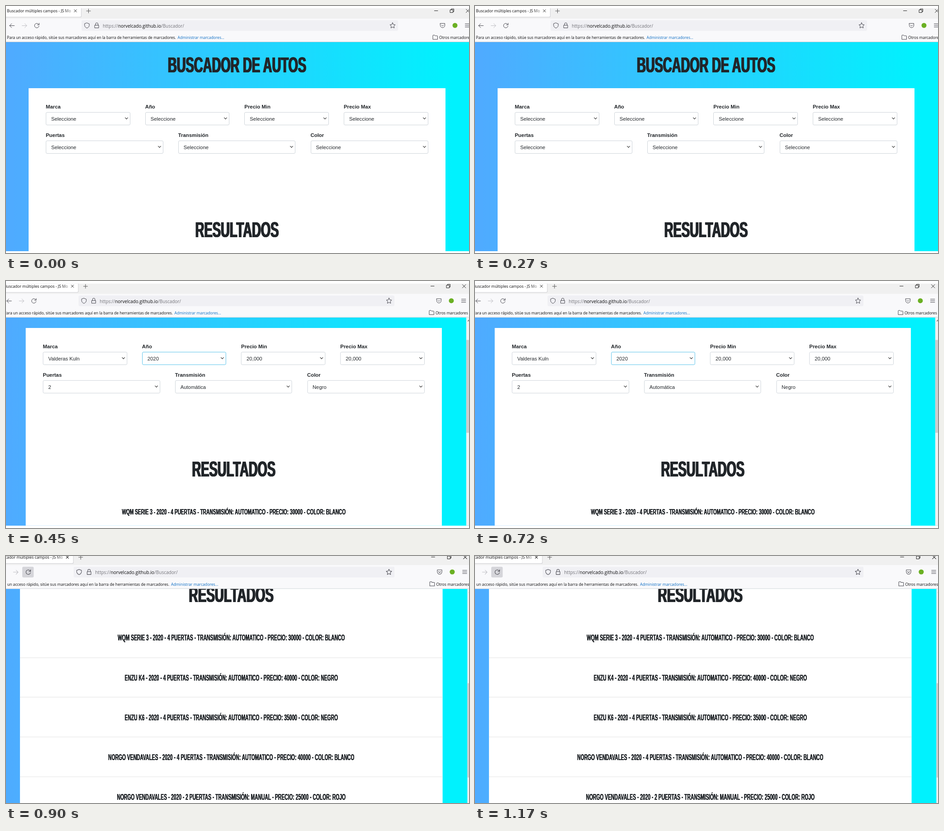
An HTML page for the animation above (1.35 s loop, 1024 px wide and 547 px high).

```html
<!DOCTYPE html>
<html lang="es">
<head>
<meta charset="utf-8">
<title>Buscador múltiples campos</title>
<style>
html, body { margin: 0; width: 100%; height: 100%; overflow: hidden; background: #fff; }
#stage { position: relative; width: 1024px; height: 547px; overflow: hidden; }
#win { position: absolute; left: 0; top: 0; width: 1040px; height: 600px; transform-origin: 0 0; }
#page { position: absolute; left: 0; top: 80px; width: 1040px; overflow: hidden;
  background: linear-gradient(90deg, #50aaff, #00f2fe 990px); }
#content { position: absolute; left: 0; top: -80px; width: 1026px; }
#card { position: absolute; left: 50px; top: 182px; width: 922px; height: 1000px; background: #fff; }
#bar { position: absolute; left: 1026px; top: 0; width: 14px; height: 100%; background: #f0f0f0; }
#thumb { position: absolute; width: 100%; height: 206px; background: #cdcdcd; }
#chrome { position: absolute; left: 0; top: 0; }
/* zero line height: "top" is the middle of the capitals */
.t { position: absolute; line-height: 0; white-space: nowrap; color: #212529; }
.ui { font: 8.55px/0 "Open Sans", "Noto Sans", sans-serif; color: #0c0c0d; }
.tab { font-size: 8.7px; }
.url { font-size: 9.95px; color: #737379; }
.url b { font-weight: 400; color: #0c0c0d; }
.link { color: #0a6cc4; }
.label { font: bold 11.4px/0 "Liberation Sans", Arial, sans-serif; }
.h, .row { font: bold 47.5px/0 "Liberation Sans", Arial, sans-serif; left: 510.7px;
  transform: translateX(-50%) scaleX(.577); text-shadow: .036em 0, -.036em 0; }
.row { font-size: 17.3px; transform: translateX(-50%) scaleX(.587); text-shadow: .012em 0, -.012em 0; }
.rule { position: absolute; left: 50px; width: 922px; height: 1px; background: #e3e3e3; }
.select { position: absolute; box-sizing: border-box; height: 29.5px; border: 1px solid #ced4da;
  border-radius: 3px; background: #fff; color: #24282c; padding-left: 11px;
  font: 11.3px/28.5px "Liberation Sans", Arial, sans-serif; }
.select::after { content: ""; position: absolute; right: 5px; top: 9.5px; width: 4px; height: 4px;
  border: solid #222; border-width: 0 1.4px 1.4px 0; transform: rotate(45deg); }
.select.focus { border-color: #59c2ea; }
</style>
</head>
<body>
<div id="stage">
  <div id="win">
    <div id="page">
      <div id="content"><div id="card"></div></div>
      <div id="bar">
        <div id="thumb"></div>
        <svg width="14" height="14" fill="none" stroke="#606060" stroke-width="1.4"><path d="M3.5 8.5l3-3 3 3"/></svg>
      </div>
    </div>
    <svg id="chrome" width="1040" height="80" fill="none" stroke="#45454d" stroke-linecap="round" stroke-linejoin="round">
      <g stroke="none">
        <path fill="#f0f0f0" d="M0 5h1040v23H0z"/>
        <path fill="#f9f9fb" d="M0 28h1040v52H0z"/>
        <path fill="#cfcfd3" d="M0 79h1040v1H0z"/>
        <path fill="#d0d0d4" d="M0 5h167v17.500a2.500 2.500 0 0 1-2.500 2.500H0z"/>
        <path fill="#fff" d="M0 5h166v17a2 2 0 0 1-2 2H0z"/>
        <rect fill="#f0f0f4" x="167" y="31.500" width="700" height="23.500" rx="3"/>
        <rect id="press" fill="#d5d5da" x="55" y="31.500" width="25" height="23.500" rx="3"/>
        <circle fill="#6ab023" cx="993" cy="43" r="5.500"/>
      </g>
      <path d="M18.500 43.500H8M12.500 39L8 43.500l4.500 4.500"/>
      <path stroke="#bdbdc2" d="M35.500 43.500H46M41.500 39l4.500 4.500-4.500 4.500"/>
      <path d="M72.500 41A5 5 0 1 0 73 44.500M73.300 38v3.800h-3.800"/>
      <path d="M179 37.500l5.200 2v3c0 3-2 5-5.200 6.500-3.200-1.500-5.200-3.500-5.200-6.500v-3z"/>
      <path d="M196.500 42.500h8.500v6h-8.500zM198 42.500V40a2.750 2.750 0 0 1 5.500 0v2.500"/>
      <path d="M855 37l1.800 4 4.200.5-3.100 2.900.8 4.300-3.700-2.100-3.700 2.100.8-4.300-3.100-2.900 4.200-.5z"/>
      <path d="M960.500 38.500h10v4.500a5 5 0 0 1-10 0zM963 42l2.500 2.500 2.500-2.500"/>
      <path d="M1015.500 39.500h9.500m-9.500 3.500h9.500m-9.500 3.500h9.500"/>
      <path d="M944 73.500v-8a1 1 0 0 1 1-1h3l1.300 1.500h4.200a1 1 0 0 1 1 1v6.500z"/>
      <g stroke="#222">
        <path d="M150.800 8l5.400 5.400m0-5.400l-5.400 5.400"/>
        <path d="M178 11h9m-4.500-4.500v9" stroke="#555"/>
        <path d="M947.500 10.500h7.500"/>
        <path d="M982.500 8.500h6v6h-6zM984.500 8.500v-2h6v6h-2"/>
        <path d="M1017.500 7l7.500 7.500m0-7.500l-7.500 7.500"/>
      </g>
    </svg>
  </div>
</div>
<script>
const $ = id => document.getElementById(id);
const win = $('win'), content = $('content');

function add(parent, cls, html, style) {
  const el = document.createElement('div');
  el.className = cls;
  el.innerHTML = html;
  for (const k in style) el.style[k] = style[k] + 'px';
  return parent.appendChild(el);
}
const text = (parent, cls, html, left, top) => add(parent, 't ' + cls, html, { left, top });
const centred = (cls, html, top) => add(content, 't ' + cls, html, { top });

// Browser bar
const title = text(win, 'ui tab', 'Buscador múltiples campos - JS Mo', 2, 11);
title.style.cssText += 'color:transparent;background:linear-gradient(90deg,#0c0c0d 124px,#0c0c0d44 148px);' +
  '-webkit-background-clip:text;background-clip:text;padding:8px 0;margin-top:-8px';
text(win, 'ui url', 'https://<b>norvelcado.github.io</b>/Buscador/', 214, 43.5);
text(win, 'ui', 'Para un acceso rápido, sitúe sus marcadores aquí en la barra de herramientas de marcadores.', 2, 69.5);
text(win, 'ui link', 'Administrar marcadores...', 379.5, 69.5);
text(win, 'ui', 'Otros marcadores', 958, 69.5);

// Search form: label, chosen value, left, top, width
const fields = [
  ['Marca', 'Valderas Kuln', 88, 234.5, 186.5],
  ['Año', '2020', 307.7, 234.5, 186.5],
  ['Precio Min', '20,000', 527.3, 234.5, 186.5],
  ['Precio Max', '20,000', 747, 234.5, 186.5],
  ['Puertas', '2', 88, 297.5, 259.5],
  ['Transmisión', 'Automática', 380.7, 297.5, 259.5],
  ['Color', 'Negro', 673.5, 297.5, 260]
].map(([label, value, left, top, width]) => {
  text(content, 'label', label, left, top - 12);
  return { value, el: add(content, 'select', '', { left, top, width }) };
});

// Headings and results
centred('h', 'BUSCADOR DE AUTOS', 131);
centred('h', 'RESULTADOS', 496);
[
  ['WQM SERIE 3', 4, 'AUTOMATICO', 30000, 'BLANCO'],
  ['ENZU K4', 4, 'AUTOMATICO', 40000, 'NEGRO'],
  ['ENZU K6', 4, 'AUTOMATICO', 35000, 'NEGRO'],
  ['NORGO VENDAVALES', 4, 'AUTOMATICO', 40000, 'BLANCO'],
  ['NORGO VENDAVALES', 2, 'MANUAL', 25000, 'ROJO']
].forEach(([car, doors, gear, price, color], i) => {
  const y = 590 + 86.9 * i;
  centred('row', `${car} - 2020 - ${doors} PUERTAS - TRANSMISIÓN: ${gear} - PRECIO: ${price} - COLOR: ${color}`, y);
  add(content, 'rule', '', { top: y + 42.5 });
});

// Window offset and zoom, page scroll, page bottom, scrollbar thumb
const poses = [
  { x: 0, y: 0, zoom: 1, scroll: 0, bottom: 543, thumb: 14 },
  { x: -6.3, y: .8, zoom: .9982, scroll: 78.6, bottom: 542, thumb: 49.5, filled: true },
  { x: -19.8, y: -8.3, zoom: 1.0138, scroll: 403, bottom: 560, thumb: 205.5, filled: true, reload: true }
];
let shown;

function draw(now) {
  const pose = poses[Math.floor(now % 1350 / 450)];
  if (pose !== shown) {
    shown = pose;
    win.style.transform = `translate(${pose.x}px, ${pose.y}px) scale(${pose.zoom})`;
    content.style.transform = `translateY(${-pose.scroll}px)`;
    $('page').style.height = pose.bottom - 80 + 'px';
    $('thumb').style.top = pose.thumb + 'px';
    $('press').style.opacity = pose.reload ? 1 : 0;
    for (const f of fields) f.el.textContent = pose.filled ? f.value : 'Seleccione';
    fields[1].el.classList.toggle('focus', !!pose.filled);
  }
  requestAnimationFrame(draw);
}
draw(performance.now());
</script>
</body>
</html>
```
